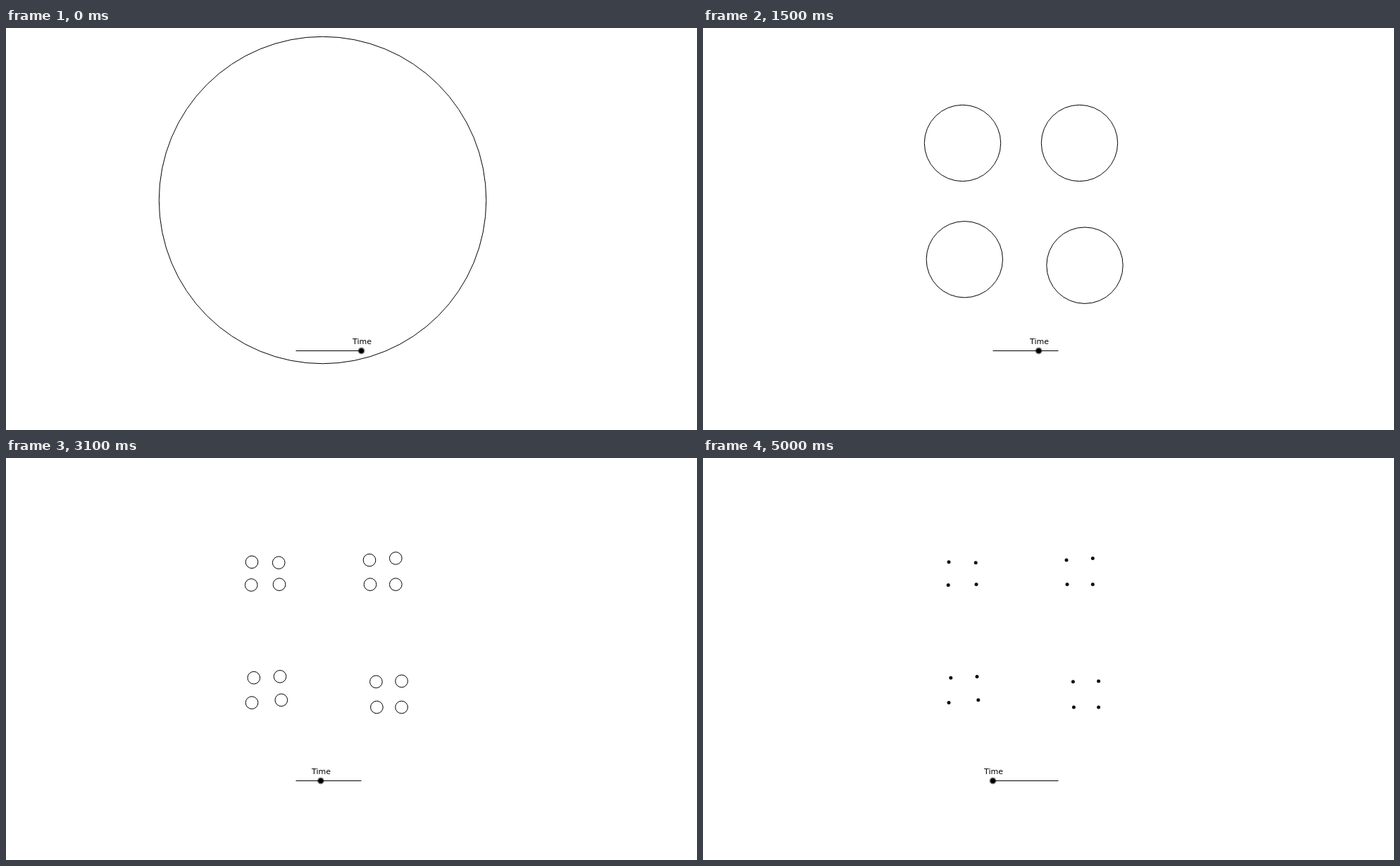
An HTML page with a canvas that plays this animation: 981 by 571 pixels, repeating every 5.1 s.

```html
<!DOCTYPE html>
<html lang="en">
<head>
<meta charset="utf-8">
<title>Shrinking circles</title>
<style>
  html, body { margin: 0; width: 981px; height: 571px; overflow: hidden; background: #fff; }
  canvas { display: block; }
</style>
</head>
<body>
<canvas id="stage" width="981" height="571"></canvas>
<script>
const ctx = document.getElementById('stage').getContext('2d');
const STEP_MS = 100, STEPS = 51, UNIT = 46.45;
const SLIDER = { left: 411.5, right: 504.5, y: 458.5 };

const large = [[449.5, 244.5]];
const medium = [[368.5, 163.5], [534.5, 163.5], [371.3, 328.7], [542, 337.2]];
const small = [
  [349, 147.8], [387.2, 148.7], [348.2, 180.4], [388, 179.6],
  [516, 145.1], [553.3, 142.4], [517, 179.6], [553.3, 179.6],
  [351.8, 312.2], [389, 310.4], [349, 347.6], [390.8, 343.8],
  [525.4, 317.8], [561.6, 316.9], [526.4, 354], [561.6, 354]
];

function disc(x, y, r, color) {
  ctx.fillStyle = color;
  ctx.beginPath();
  ctx.arc(x, y, r, 0, 2 * Math.PI);
  ctx.fill();
}

function rings(centers, r) {
  for (const [x, y] of centers) {
    ctx.beginPath();
    ctx.arc(x, y, r, 0, 2 * Math.PI);
    ctx.stroke();
  }
}

function drawSlider(progress) {
  const { left, right, y } = SLIDER;
  const knob = right - (right - left) * progress;
  ctx.beginPath();
  ctx.moveTo(left, y);
  ctx.lineTo(right, y);
  ctx.stroke();
  disc(knob, y, 5, 'rgba(0,0,0,0.45)');
  disc(knob, y, 3.5, '#000');
  ctx.fillText('Time', Math.round(knob - 12.75), 449);
}

function draw(step) {
  const time = (STEPS - 1 - step) / 10;
  ctx.fillStyle = '#fff';
  ctx.fillRect(0, 0, 981, 571);
  ctx.strokeStyle = '#000';
  ctx.lineWidth = 1;
  ctx.font = '11px "DejaVu Sans", sans-serif';

  if (time > 4) rings(large, UNIT * time);
  else if (time > 2.5) rings(medium, UNIT * time / 3);
  else if (time > 0) rings(small, UNIT * time / 10);
  else for (const [x, y] of small) disc(x, y, 2.5, '#111');

  drawSlider(step / (STEPS - 1));
}

const start = performance.now();
function tick() {
  draw(Math.floor((performance.now() - start) / STEP_MS) % STEPS);
  requestAnimationFrame(tick);
}
tick();
</script>
</body>
</html>
```
